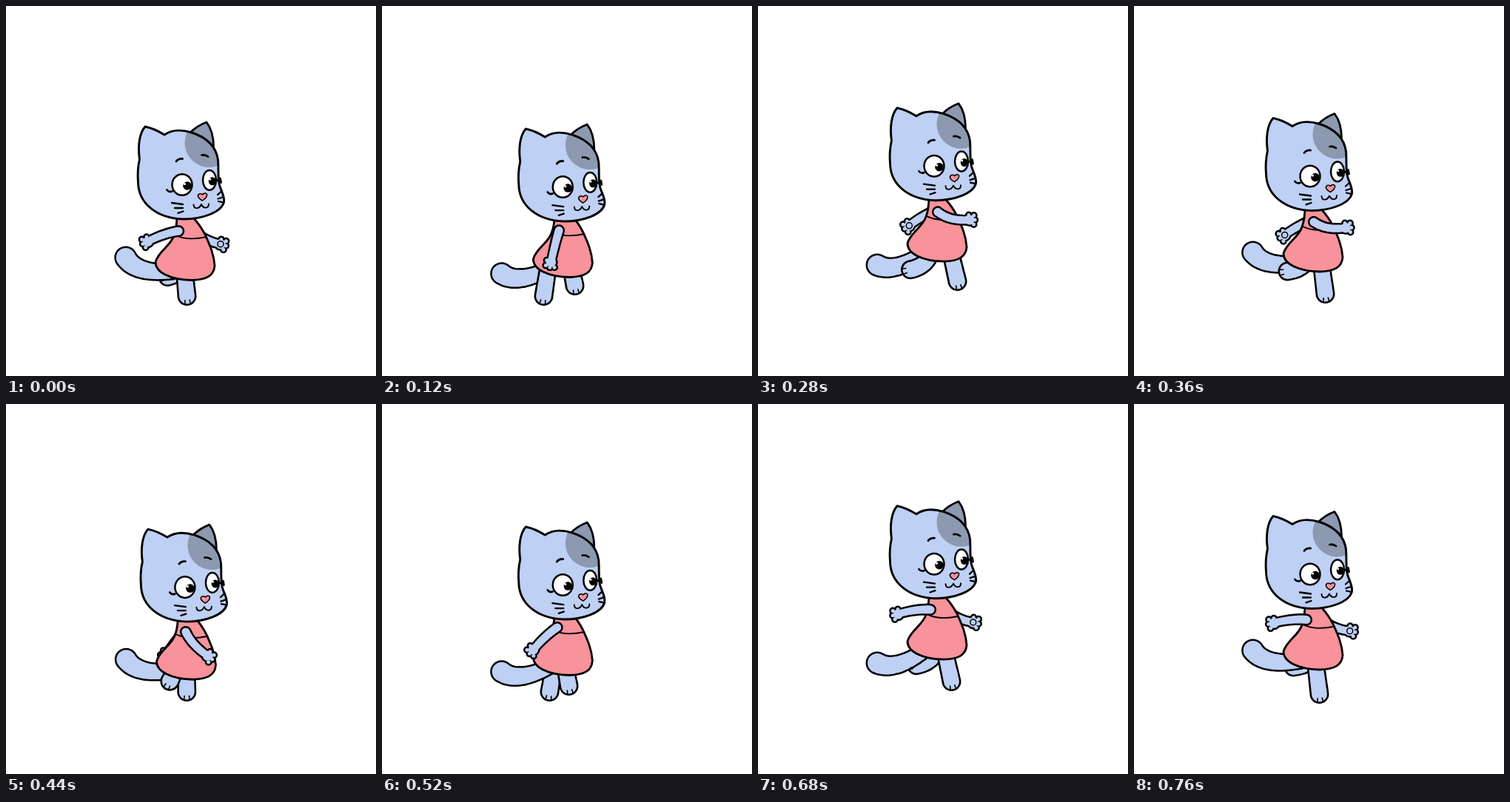
An HTML page with a canvas for the animation above (800 ms loop, 500 by 500 pixels).

```html
<!DOCTYPE html>
<html lang="en">
<head>
<meta charset="utf-8">
<title>Running cat</title>
<style>
  html, body { margin: 0; width: 100%; height: 100%; overflow: hidden; background: #fff; }
  canvas { display: block; width: 500px; height: 500px; }
</style>
</head>
<body>
<canvas id="stage" width="500" height="500"></canvas>
<script>
const ctx = document.getElementById('stage').getContext('2d');
const INK = '#000', FUR = '#bed0f3', PATCH = '#8c99b0', PINK = '#f8929b';
const LOOP = 800, STRIDE = LOOP / 2, STEP = 40, TAU = Math.PI * 2;

const clamp = v => Math.min(1, Math.max(0, v));
const mix = (a, b, s) => a + (b - a) * s;
const rad = deg => deg * Math.PI / 180;

// Smooth cyclic motion through a few poses [time, ...values], without overshoot.
function track(period, rows) {
  const n = rows.length;
  const row = i => rows[(i + n) % n];
  const span = i => (row(i + 1)[0] - row(i)[0] + period) % period;
  const slope = (i, c) => (row(i + 1)[c] - row(i)[c]) / span(i);
  const tangent = (i, c) => {
    const a = slope(i - 1, c), b = slope(i, c);
    return a * b <= 0 ? 0 : 2 * a * b / (a + b);
  };
  return time => {
    const t = time % period;
    let i = n - 1;
    while (rows[i][0] > t) i--;
    const h = span(i), s = (t - rows[i][0]) / h, q = s * s * (3 - 2 * s);
    return rows[i].slice(1).map((v, k) => mix(v, row(i + 1)[k + 1], q)
      + h * s * (1 - s) * ((1 - s) * tangent(i, k + 1) - s * tangent(i + 1, k + 1)));
  };
}

// Once per stride: body height, tail angle.
const bounce = track(STRIDE, [
  [0, 32, 197], [60, 34, 191], [120, 28, 174], [200, 0, 144], [360, 20.5, 193]]);

// Once per loop: arm angle, foot x, foot y. The far side runs half a loop apart.
const gait = track(LOOP, [
  [0, 161, 244.5, 392], [120, 104, 218.5, 392], [200, 23, 205.5, 355.5], [360, 10, 207.5, 358.5],
  [400, 16, 210.5, 369], [520, 137, 252.5, 381], [600, 167, 267.5, 358], [760, 174, 250.5, 392]]);

const skull = new Path2D('M180.5 175C178 158 180 140 188 131C198 133 206 137 214 142' +
  'C224 135 238 135 251 139C272 146 284 158 286.5 176C287.5 188 286 200 288.5 210' +
  'C291 219 295.5 224 294.5 233C291 247 265 256 240 256C205 255 179 236 178.5 206C177.5 195 178.5 184 180.5 175Z');
const ear = new Path2D('M249 139C256 132 263 128 271 125C278 134 280.5 146 280.5 159Z');
const dress = new Path2D('M231 250Q231 268 227 278C223 292 206 299 202 314' +
  'C202 328 222 338 251 338.5C272 338 281 332 282 319C281 302 274 288 269 277Q263 265 253 254Z');
const waist = new Path2D('M227 277Q245 286 271 280');
const nose = new Path2D('M265.5 231C261 228.5 258 225.5 260 222.8C262 221 264.5 221.5 265.5 223' +
  'C267.5 220.5 270.5 220.5 271.5 222.5C272 225.5 268.5 229 265.5 231Z');
const mouth = new Path2D('M253.5 236.5C254 243 261 242.5 264 236C267 242.5 274 242 274 235.5');
const whiskers = new Path2D('M224 234L239 236M228 241L239 241M232.5 247.8L239.5 245.5' +
  'M286 223L291.5 218M286.5 228.5L294 226M287 232L294 233.5');
const brows = new Path2D('M230 178Q233 174 238.5 174.5M264.5 169.5Q269 168.5 273 171.5');
const lashes = new Path2D('M217.5 216.5Q220 220 224.5 218.5M284 204L290 203M289.5 201L290.5 206.5');

function line(path, width) {
  ctx.strokeStyle = INK;
  ctx.lineWidth = width;
  ctx.stroke(path);
}

function shape(path, fill, width) {
  ctx.fillStyle = fill;
  ctx.fill(path);
  if (width) line(path, width);
}

function oval(x, y, rx, ry, fill, width) {
  const p = new Path2D();
  p.ellipse(x, y, rx, ry, 0, 0, TAU);
  shape(p, fill, width);
}

// Outlined tapering tube along a curve, with optional round knobs merged into it.
function tube(a, c, b, r0, r1, knobs = []) {
  const discs = [...knobs];
  for (let s = 0; s <= 1.001; s += 1 / 48) {
    const at = k => mix(mix(a[k], c[k], s), mix(c[k], b[k], s), s);
    discs.push([at(0), at(1), mix(r0, r1, s)]);
  }
  for (const [color, inset] of [[INK, 0], [FUR, 2.5]]) {
    const p = new Path2D();
    for (const [x, y, r] of discs) {
      p.moveTo(x + r - inset, y);
      p.arc(x, y, r - inset, 0, TAU);
    }
    shape(p, color);
  }
}

// Maps points given along and across a direction to the stage.
function local([ox, oy], angle) {
  const co = Math.cos(angle), si = Math.sin(angle);
  return (x, y) => [ox + x * co - y * si, oy + x * si + y * co];
}

function arm(x, y, angle, pad) {
  const len = 50, reach = Math.cos(angle);
  const bend = 2.5 * reach + 6.5 * Math.abs(reach);
  const at = local([x, y], angle);
  const tip = local(at(len, 0), angle - bend * 0.025);
  const knobs = [[-1, 0, 9.2]];
  for (const v of [-1, 0, 1]) knobs.push([6.5 - 1.5 * v * v, 6 * v, 5]);
  knobs.push([-2, reach > 0 ? -6.5 : 6.5, 4.8]);
  tube(at(5, 0), at(len / 2, bend), at(len, 0), 8, 7.3,
    knobs.map(([u, v, r]) => [...tip(u, v), r]));
  if (pad) oval(...tip(-1, 0), 4, 4, FUR, 1.5);
}

function leg(x, y, fx, fy) {
  const back = clamp((385 - fy) / 25) * clamp((x - fx) / 20);
  const hip = mix(x, fx, 0.6 * (1 - back));
  const knee = [mix((hip + fx) / 2, hip, back), mix(y, fy, mix(0.5, 0.8, back))];
  tube([hip, y], knee, [fx, fy], 12, 13);
  const at = local([fx, fy], Math.atan2(fy - knee[1], fx - knee[0]));
  const toes = new Path2D();
  for (const v of [-3.5, 3.5]) {
    toes.moveTo(...at(5.5, v * 0.9));
    toes.lineTo(...at(11, v * 1.1));
  }
  line(toes, 1.6);
}

function tail(angle) {
  const root = [224, 327];
  tube(root, local(root, angle - rad(21))(49, 0), local(root, angle)(65, 0), 11.5, 15.5);
}

function shifted(x, y, draw) {
  ctx.save();
  ctx.translate(x, y);
  draw();
  ctx.restore();
}

function head() {
  shape(ear, PATCH, 2.8);
  shape(skull, FUR);
  ctx.save();
  ctx.clip(skull);
  oval(274.5, 153, 33, 33, PATCH);
  ctx.restore();
  line(skull, 2.9);
  oval(238, 209.5, 13.5, 14.3, '#fff', 2.5);
  oval(275, 203.3, 9, 13.4, '#fff', 2.5);
  oval(245, 211, 5.8, 5.8, INK);
  oval(241.5, 208.5, 1.6, 1.6, '#fff');
  oval(278.8, 204.8, 5, 5.5, INK);
  oval(275.8, 202.3, 1.4, 1.4, '#fff');
  line(lashes, 2.8);
  line(brows, 2.8);
  line(whiskers, 2.3);
  line(mouth, 1.9);
  shape(nose, PINK, 1.5);
}

function draw(t) {
  const [y, swing] = bounce(t);
  const squash = Math.max(0, Math.sin(TAU * t / STRIDE));
  const squashNow = t % STRIDE < STRIDE / 2 ? Math.sin(TAU * (t % STRIDE) / STRIDE) : squash * 0;
  const x = 2.5 * squashNow;
  const [nearArm, nearX, nearY] = gait(t);
  const [farArm, farX, farY] = gait(t + STRIDE);

  ctx.fillStyle = '#fff';
  ctx.fillRect(0, 0, 500, 500);
  ctx.lineCap = ctx.lineJoin = 'round';
  shifted(x, y, () => arm(247, 266, rad(88 + (farArm - 92) * 0.78), true));
  leg(242 + x, 318 + y, farX + 8, farY - 3);
  shifted(x, y, () => tail(rad(swing)));
  leg(234 + x, 318 + y, nearX, nearY);
  shifted(x, y, () => {
    shape(dress, PINK, 2.8);
    line(waist, 1.9);
    arm(238, 270.5, rad(nearArm), false);
  });
  shifted(6.6 * squashNow, y + 7.4 * squashNow, head);
}

const start = performance.now();
function tick() {
  const t = Math.max(0, performance.now() - start) % LOOP;
  draw(Math.floor((t + 0.5) / STEP) * STEP % LOOP);
  requestAnimationFrame(tick);
}
tick();
</script>
</body>
</html>
```
